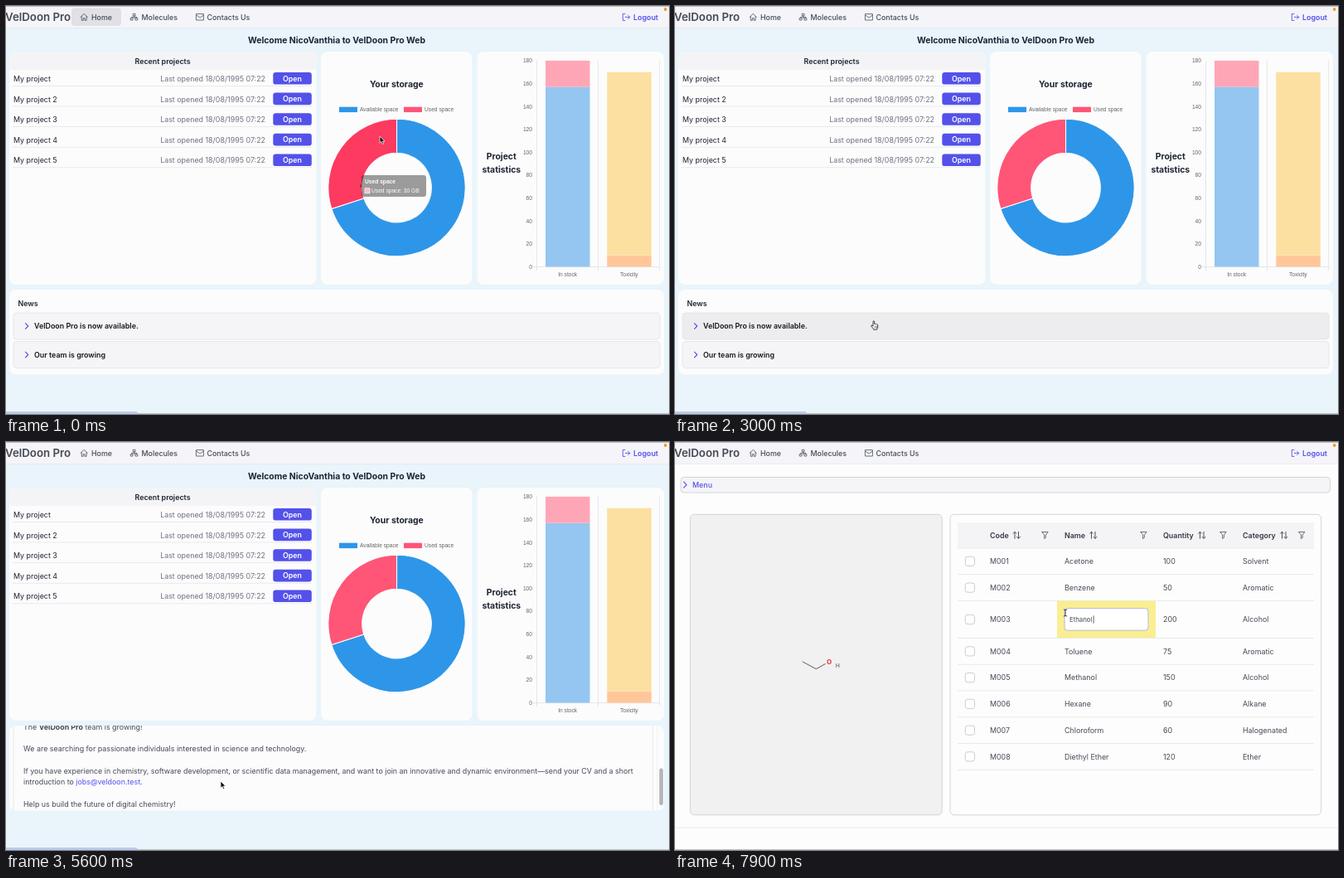
Recreate the animation shown at these times as an HTML page. Size 800x492 px, loop 8 s.

```html
<!DOCTYPE html>
<html lang="en">
<head>
<meta charset="utf-8">
<title>Lab inventory tour</title>
<style>
  html, body { margin: 0; width: 100%; height: 100%; overflow: hidden; background: #fdfdfd; }
  svg { display: block; width: 800px; height: 492px; }
  text { font-family: Inter, "Open Sans", sans-serif; white-space: pre; }
  .chart { font-family: "Liberation Sans", Arial, sans-serif; }
  .line { fill: none; stroke-linecap: round; stroke-linejoin: round; }
</style>
</head>
<body>
<svg id="stage" viewBox="0 0 800 492"></svg>
<script>
const LOOP = 8000, STEP = 100, BASE = 8.89;
const INK = '#1e2433', BODY = '#454a57', PRIMARY = '#5351ea', CARD = '#fcfcfd', EDGE = '#e3e3e8';
const BRAND = 'VelDoon Pro', USER = 'NicoVanthia', MAIL = 'jobs@veldoon.test';

// Markup helpers; text is placed by the middle of its capitals.
const text = (x, y, str, { size = BASE, weight = 400, fill = BODY, anchor = 'start', cls = '' } = {}) =>
  `<text class="${cls}" x="${x}" y="${y + size * 0.364}" font-size="${size}" font-weight="${weight}" fill="${fill}" text-anchor="${anchor}">${str}</text>`;
const rect = (x, y, w, h, fill, r = 0, extra = '') =>
  `<rect x="${x}" y="${y}" width="${w}" height="${h}" rx="${r}" fill="${fill}" ${extra}/>`;
const stroke = (d, color, width = 0.9, extra = '') =>
  `<path class="line" d="${d}" stroke="${color}" stroke-width="${width}" ${extra}/>`;
const group = (id, inner, extra = '') => `<g id="${id}" ${extra}>${inner}</g>`;
const series = (n, fn) => Array.from({ length: n }, (_, i) => fn(i)).join('');

function navBar() {
  const item = (x, str) => text(x, 13.3, str, { weight: 500 });
  const box = (x, y) => `M${x} ${y}h2.4v2.4h-2.4z`;
  return rect(0, 0, 800, 26.5, '#f5f5f9') + rect(0, 26, 800, 0.7, '#e6e6ec') +
    group('homePill', rect(79, 2.5, 60, 21.5, '#e1e1e5', 4)) +
    group('molPill', rect(140, 2.5, 77, 21.5, '#e1e1e5', 4)) +
    text(-1, 13.3, BRAND, { size: 13.3, weight: 600, fill: '#454955' }) +
    stroke('M90 13.4l4.2-4 4.2 4M91.3 12.6v4.7h2v-2.7h1.8v2.7h2v-4.7', '#5b606c') + item(103, 'Home') +
    stroke(box(153.6, 9.3) + box(150.6, 14.6) + box(156.4, 14.6) + 'M154.8 11.8v2.8M151.8 14.5v-1.3h5.8v1.3', '#5b606c') +
    item(163.5, 'Molecules') +
    stroke('M229.8 9.6h8.6v7.4h-8.6zM229.8 11l4.3 3.1 4.3-3.1', '#5b606c') + item(242.5, 'Contacts Us') +
    stroke('M747 9.4h-2.7v8h2.7M747.3 13.4h5.4M750.6 11.2l2.2 2.2-2.2 2.2', PRIMARY) +
    text(757, 13.3, 'Logout', { weight: 600, fill: PRIMARY });
}

function projectsCard() {
  const row = i => {
    const y = 87.4 + 24.62 * i;
    return text(9, y + 0.3, 'My project' + (i ? ' ' + (i + 1) : ''), { fill: INK }) +
      text(313, y + 0.3, 'Last opened 18/08/1995 07:22', { fill: '#6f7380', anchor: 'end' }) +
      rect(322.3, y - 7.4, 46.5, 14.6, PRIMARY, 3.2) +
      text(345.5, y, 'Open', { weight: 600, fill: '#fff', anchor: 'middle' }) +
      rect(8, y + 8.6, 361, 0.7, EDGE);
  };
  return rect(4, 55, 370.5, 281, CARD, 8) +
    `<path d="M4 77V63a8 8 0 0 1 8-8h354.500a8 8 0 0 1 8 8v14z" fill="#f4f4f7"/>` +
    text(189, 66.3, 'Recent projects', { weight: 600, fill: INK, anchor: 'middle' }) + series(5, row);
}

function ringSlice(from, to, fill, id) {
  const at = (r, a) => `${471.5 + r * Math.sin(a)} ${219 - r * Math.cos(a)}`;
  const a = from * 2 * Math.PI, b = to * 2 * Math.PI, big = to - from > 0.5 ? 1 : 0;
  return `<path id="${id}" d="M${at(82.7, a)}A82.7 82.7 0 ${big} 1 ${at(82.7, b)}L${at(41.8, b)}A41.8 41.8 0 ${big} 0 ${at(41.8, a)}z" fill="${fill}" stroke="${CARD}" stroke-width="1.1"/>`;
}

function storageCard() {
  const key = (x, fill, str) => rect(x, 121.7, 22, 6.4, fill) +
    text(x + 25, 125, str, { size: 6.67, fill: '#666', cls: 'chart' });
  const tip = `<path d="M432 204h72a3 3 0 0 1 3 3v20a3 3 0 0 1-3 3h-72a3 3 0 0 1-3-3v-7l-2.500-3 2.500-3v-7a3 3 0 0 1 3-3z"/>` +
    text(433, 211.5, 'Used space', { size: 6.67, weight: 700, fill: '#fff', cls: 'chart' }) +
    rect(433, 219.8, 6, 6, '#ff5577', 0, 'stroke="#fff" stroke-width=".7"') +
    text(441, 223, 'Used space: 30 GB', { size: 6.67, fill: '#fff', cls: 'chart' });
  return rect(380, 55, 182.5, 281, CARD, 8) +
    text(471.3, 94, 'Your storage', { size: 10.4, weight: 700, fill: INK, anchor: 'middle' }) +
    key(402, '#2e96e8', 'Available space') + key(480, '#ff5577', 'Used space') +
    ringSlice(0, 0.7, '#2e96e8', 'free') + ringSlice(0.7, 1, '#ff5577', 'used') + group('tip', tip);
}

function statsCard() {
  const y = v => 314.5 - v * 1.381;
  const bar = (x, lo, hi, fill) => rect(x, y(hi), 53.5, y(lo) - y(hi), fill);
  const label = (x, yc, str, anchor) => text(x, yc, str, { size: 6.67, fill: '#666', anchor, cls: 'chart' });
  const title = { size: 10.4, weight: 700, fill: INK, anchor: 'middle' };
  return rect(568.5, 55, 225.5, 281, CARD, 8) +
    text(597.8, 181, 'Project', title) + text(597.8, 197, 'statistics', title) +
    series(3, i => rect(640 + 74.2 * i, 66, 0.7, 253, '#dedee2')) + rect(636, 314.4, 153, 0.7, '#dedee2') +
    series(10, i => label(635, y(20 * i), 20 * i, 'end')) +
    bar(651, 0, 157, '#94c6f1') + bar(651, 157, 180, '#ffa6b6') +
    bar(725.3, 0, 10, '#ffc799') + bar(725.3, 10, 170, '#fce0a1') +
    label(677.7, 324, 'In stock', 'middle') + label(751.8, 324, 'Toxicity', 'middle');
}

function homePage() {
  return rect(0, 26, 800, 466, '#e9f4fb') +
    text(399, 41.3, `Welcome ${USER} to ${BRAND} Web`, { size: 10.4, weight: 700, fill: INK, anchor: 'middle' }) +
    projectsCard() + storageCard() + statsCard() + rect(4, 342, 790, 102.5, CARD, 8) +
    '<clipPath id="newsClip"><rect x="4" y="342" width="790" height="102.500" rx="8"/></clipPath>' +
    group('news', '', 'clip-path="url(#newsClip)"');
}

const INTRO = [[0, `VelDoon Pro is now available.`]];
const TEAM = [
  [0, `The <tspan font-weight="700">${BRAND}</tspan> team is growing!`],
  [2, 'We are searching for passionate individuals interested in science and technology.'],
  [4, 'If you have experience in chemistry, software development, or scientific data management, and want to join an innovative and dynamic environment—send your CV and a short'],
  [5, `introduction to <tspan fill="${PRIMARY}">${MAIL}</tspan>.`],
  [7, 'Help us build the future of digital chemistry!'],
];

function newsPanel({ first, second, hover, scroll }) {
  const view = 102, full = view + first + second, overflows = full > view + 1;
  const width = overflows ? 771.5 : 780;
  const panel = (id, y, title, lines, height) => {
    const chevron = height > 0 ? 'M21.800 -1.700l3.300 3.300 3.300-3.300' : 'M23.400 -3.400l3.300 3.400-3.300 3.400';
    let out = rect(9, y, width, 32, hover === id ? '#ededf0' : '#f5f5f8', 4, `stroke="${EDGE}" stroke-width=".8"`) +
      stroke(chevron, PRIMARY, 1.1, `transform="translate(0 ${y + 16})"`) +
      text(34, y + 16, title, { weight: 600, fill: '#14161d' });
    if (height > 0) {
      out += rect(9, y + 32, width, height, CARD, 0, `stroke="${EDGE}" stroke-width=".8"`) +
        `<clipPath id="body${id}"><rect x="9" y="${y + 32}" width="${width}" height="${height}"/></clipPath>` +
        group('lines' + id, lines.map(([n, str]) => text(21, y + 50 + 13.34 * n, str)).join(''), `clip-path="url(#body${id})"`);
    }
    return out;
  };
  const list = text(14.5, 358.3, 'News', { weight: 600, fill: INK }) +
    panel(1, 370, BRAND + ' is now available.', INTRO, first) +
    panel(2, 404.5 + first, 'Our team is growing', TEAM, second);
  const bar = overflows ? rect(785.5, 342, 0.6, 103, '#e9e9ec') +
    rect(788.3, 343 + scroll * view / full, 4.6, view * view / full - 2, '#b5b5b9', 2.3) : '';
  return `<g transform="translate(0 ${-scroll})">${list}</g>${bar}`;
}

const COLUMNS = [['Code', 380, 412, 446.5], ['Name', 470, 504.5, 565.5], ['Quantity', 589, 635.5, 661.5], ['Category', 685, 734.5, 756.3]];
const STOCK = [
  ['Acetone', 100, 'Solvent'], ['Benzene', 50, 'Aromatic'], ['Ethanol', 200, 'Alcohol'], ['Toluene', 75, 'Aromatic'],
  ['Methanol', 150, 'Alcohol'], ['Hexane', 90, 'Alkane'], ['Chloroform', 60, 'Halogenated'], ['Diethyl Ether', 120, 'Ether'],
];

function stockTable(editing) {
  let top = 128, out = rect(341, 97, 430, 31, '#f4f4f7') + rect(341, 127.6, 430, 0.7, EDGE);
  for (const [name, x, sortX, filterX] of COLUMNS) {
    out += text(x, 112.3, name, { weight: 600, fill: '#333844' }) +
      stroke('M-2 4V-4M-4 -2l2-2 2 2M2.500 -4V4M.500 2l2 2 2-2', '#4d5360', 1, `transform="translate(${sortX} 112.300)"`) +
      stroke('M-3.600 -3.800h7.200l-2.700 3.600v3.300l-1.800 1.100v-4.400z', '#5b606c', 0.9, `transform="translate(${filterX} 112.300)"`);
  }
  STOCK.forEach(([name, amount, kind], i) => {
    const open = editing && i === 2, height = open ? 45 : 31.75, y = top + height / 2;
    if (open) out += rect(461, top, 119, height - 0.5, '#faee92') +
      rect(470, y - 13.4, 101, 26.6, '#fff', 3.5, 'stroke="#b3b8d6"') +
      text(476, y + 0.2, name, { size: 7.8 }) + rect(504.7, y - 4.7, 0.7, 9.4, '#222');
    else out += text(470, y, name);
    out += rect(350.3, y - 5.6, 11.2, 11.2, '#fff', 2.8, 'stroke="#c3c8d2" stroke-width=".9"') +
      text(380, y, 'M00' + (i + 1)) + text(589, y, amount) + text(685, y, kind);
    top += height;
    out += rect(341, top - 0.4, 430, 0.7, EDGE);
  });
  const molecule = stroke('M154 265l16.300 8.700 11-6.100', '#4a4a4a', 0.9) +
    text(186.2, 265, 'O', { size: 8, weight: 700, fill: '#e8323a', anchor: 'middle' }) +
    text(196.2, 270, 'H', { size: 6.8, weight: 600, fill: '#777', anchor: 'middle' });
  return out + (editing ? molecule : '');
}

function stockPage() {
  const frame = 'stroke="#d0d1d6" stroke-width=".9"';
  return rect(0, 26, 800, 466, '#fdfdfd') + rect(0, 464.5, 800, 1.2, '#efeff1') +
    rect(7, 42.5, 783.5, 18.5, '#f5f5f7', 4, frame) +
    stroke('M10.500 48.200l3.500 3.500-3.500 3.500', PRIMARY, 1.1) + text(21, 51.7, 'Menu', { weight: 500, fill: PRIMARY }) +
    rect(18.3, 87.3, 304, 362.5, '#f1f1f2', 5, frame) + rect(332, 87.3, 447.7, 362.5, '#fdfdfd', 5, frame) +
    group('table', '');
}

const outline = (d, fill, line, w) => `<path d="${d}" fill="${fill}" stroke="${line}" stroke-width="${w}" stroke-linejoin="round"/>`;
const pointers = {
  arrow: outline('M0 0v8.200l1.900-1.700 1.400 3.100 1.400-.6-1.400-3h2.700z', '#111', '#fff', 0.7),
  hand: outline('M-1 .2q.8-1 1.600 0v3.200q1-.6 1.500.2 1-.5 1.400.4 1.200-.3 1.200 1v2q0 1.300-.9 2.300v.9h-4.300v-.9l-2.700-3.200q-.3-1.400 1.100-1l1.100 1z', '#fff', '#222', 0.85) +
    stroke('M1 6v2.300M2.400 6v2.300M3.700 6v2.300', '#333', 0.5),
  beam: stroke('M-1.700 -4q1.700 0 1.700 1 0-1 1.700-1M0 -3v6M-1.700 4q1.700 0 1.700-1 0 1 1.700 1', '#222', 0.9),
};

const stage = document.getElementById('stage');
stage.innerHTML = group('home', homePage()) + group('stock', stockPage()) + navBar() +
  rect(0, 0, 800, 0.8, '#a9a9ae') + rect(0, 491.2, 800, 0.8, '#b2b4ba') +
  group('status', `<path d="M0 489h156q3 0 3 3H0z" fill="#b9cbe8"/>`) +
  '<circle cx="795.700" cy="4" r="1.900" fill="#f39a1e"/>' +
  group('pointer', Object.entries(pointers).map(([id, d]) => group(id, d)).join(''));
const $ = id => document.getElementById(id);

// Each track is a list of [time, value...]; values are eased between the stops.
const TRACKS = {
  pointer: [[0, 451, 157], [600, 451, 157], [1000, 385, 245], [1600, 159, 388], [2400, 159, 388], [3000, 240, 380],
    [3300, 246, 416], [3800, 257, 411], [5400, 257, 411], [5600, 259, 409], [5900, 255, 400], [6300, 196, 42],
    [6800, 182.5, 25.5], [7000, 181, 14], [7200, 181, 14], [7600, 471, 206]],
  tip: [[0, 0.38], [200, 0.8], [700, 0.8], [1000, 0]],
  first: [[2000, 0], [2300, 36], [2600, 36], [2900, 0]],
  second: [[3400, 0], [3700, 122]],
  scroll: [[3800, 0], [4700, 111], [5650, 111], [5950, 37.5]],
};

function sample(track, t) {
  const i = track.findIndex(stop => stop[0] > t);
  if (i === 0) return track[0].slice(1);
  if (i < 0) return track[track.length - 1].slice(1);
  const [t0, ...a] = track[i - 1], [t1, ...b] = track[i];
  const p = (t - t0) / (t1 - t0), e = p * p * (3 - 2 * p);
  return a.map((v, k) => v + (b[k] - v) * e);
}

const within = (t, from, to) => t >= from && t < to;
const show = (id, on) => $(id).setAttribute('visibility', on ? 'visible' : 'hidden');

function pointerKind(t) {
  if (t >= 7600) return 'beam';
  return within(t, 1500, 5500) || within(t, 6900, 7300) ? 'hand' : 'arrow';
}

function draw(t) {
  const value = name => sample(TRACKS[name], t);
  const onStock = t >= 7100, kind = pointerKind(t);
  $('home').style.display = onStock ? 'none' : '';
  $('stock').style.display = onStock ? '' : 'none';
  if (onStock) $('table').innerHTML = stockTable(t >= 7700);
  else $('news').innerHTML = newsPanel({
    first: value('first')[0], second: value('second')[0], scroll: value('scroll')[0],
    hover: within(t, 1500, 3200) ? 1 : within(t, 3200, 3800) ? 2 : 0,
  });
  $('tip').setAttribute('opacity', value('tip')[0]);
  $('used').setAttribute('fill', t < 800 ? '#fd3a5f' : '#ff5577');
  show('homePill', t < 100);
  show('molPill', within(t, 6900, 7300));
  show('status', t < 500 || within(t, 2000, 7400));
  for (const id in pointers) show(id, id === kind);
  $('pointer').setAttribute('transform', `translate(${value('pointer').join(' ')})`);
}

let last = -1;
function tick() {
  const t = Math.floor(performance.now() % LOOP / STEP) * STEP;
  if (t !== last) draw(last = t);
  requestAnimationFrame(tick);
}
tick();
</script>
</body>
</html>
```
